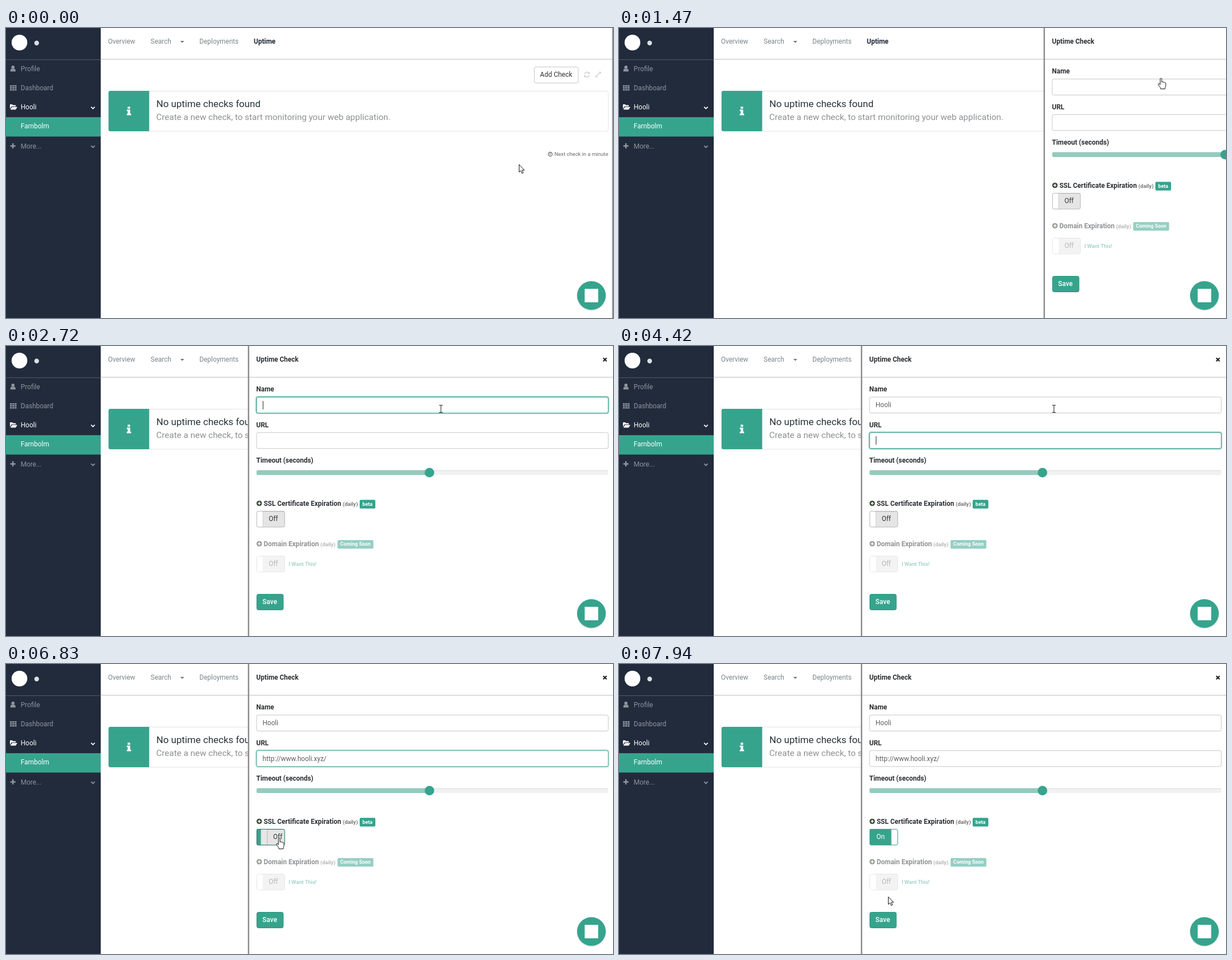
These frames come from a looping animation (1083 px wide and 517 px high, 8000 ms). An HTML page:

```html
<!DOCTYPE html>
<html lang="en">
<head>
<meta charset="utf-8">
<title>Uptime check</title>
<style>
html, body { margin: 0; width: 100%; height: 100%; overflow: hidden; background: #fff; }
svg { display: block; width: 1083px; height: 517px; }
text { font: 12px Roboto, Arial, sans-serif; fill: #333; white-space: pre; }
.b { font-weight: 700; fill: #2b2f33; }
.nav { fill: #7b868c; }
.side { fill: #8f959e; }
.w { fill: #fff; }
.m { text-anchor: middle; }
.s { font-size: 9.5px; }
.badge { font-size: 9px; font-weight: 700; fill: #fff; text-anchor: middle; }
.val { fill: #5a5d60; }
.teal { fill: #36a48d; }
.box { fill: #fff; stroke: #c6c6c6; }
.line { fill: none; stroke-width: 1.8; }
.focus rect { fill: none; stroke: #36a48d; }
.cur { fill: #fff; stroke: #111; stroke-linejoin: round; }
</style>
</head>
<body>
<svg viewBox="0 0 1083 517" xmlns="http://www.w3.org/2000/svg">
  <defs>
    <clipPath id="clipOn"><rect x="447" y="294" width="50.5" height="29" rx="3"/></clipPath>
    <g id="plusDot">
      <circle cx="451.8" cy="280.5" r="4.8"/>
      <path d="M449 280.5h5.6M451.8 277.7v5.6" stroke="#fff" stroke-width="1.6"/>
    </g>
  </defs>
  <rect width="1083" height="517" fill="#fff"/>

  <!-- main page -->
  <g>
    <rect x="169" y="55" width="914" height="1.3" fill="#c9cbcd"/>
    <text class="nav" x="182" y="28">Overview</text>
    <text class="nav" x="258" y="28">Search</text>
    <path d="M311 23h7l-3.5 3.6z" fill="#6d767c"/>
    <text class="nav" x="345" y="28">Deployments</text>
    <text class="b" x="442" y="28" style="fill:#1c2536">Uptime</text>

    <rect id="add" class="box" x="942.5" y="69.5" width="78.5" height="28.5" rx="2.5"/>
    <text class="m" x="981.6" y="87.3">Add Check</text>
    <g fill="none" stroke="#cfcfcf" stroke-width="1.5">
      <path d="M1032.2 82a4.4 4.4 0 0 1 7.6-2M1040.6 84a4.4 4.4 0 0 1-7.6 2"/>
      <path d="M1053.5 86l6-6" />
      <path d="M1041.5 77.8v4h-4zM1031.4 88.2v-4h4zM1061.5 78v4l-4-4zM1051.6 88v-4l4 4z" fill="#cfcfcf" stroke="none"/>
    </g>

    <rect x="183" y="112.5" width="891.5" height="71.5" rx="3" fill="#fff" stroke="#e4e4e4"/>
    <path class="teal" d="M186 112h69.5v72H186a3 3 0 0 1-3-3v-66a3 3 0 0 1 3-3z"/>
    <path class="w" d="M217 140.3h4.4v3.6H217zM215.5 145.6h6v7.2h1.7v2.6h-7.7v-2.6h1.7v-4.6h-1.7z"/>
    <text x="268.3" y="141" style="font-size:17.14px;fill:#263238">No uptime checks found</text>
    <text x="268" y="164.3" style="font-size:15.43px;fill:#8d9092">Create a new check, to start monitoring your web application.</text>

    <circle cx="971" cy="225" r="3.5" fill="none" stroke="#6a6a6a" stroke-width="1.3"/>
    <path d="M971.2 222.8v2.6h-1.8" fill="none" stroke="#6a6a6a"/>
    <text class="s" x="1074.5" y="228.3" text-anchor="end" style="fill:#6a6a6a">Next check in a minute</text>
  </g>

  <!-- sidebar -->
  <g>
    <rect width="169" height="517" fill="#222b3c"/>
    <rect y="56" width="169" height="1" fill="#515b69"/>
    <circle cx="24" cy="26" r="14" fill="#fff"/>
    <circle cx="54.7" cy="26.8" r="4.2" fill="#dcdfe2"/>
    <rect class="teal" y="159" width="169" height="34.5"/>
    <g fill="#8f959e">
      <circle cx="12.4" cy="70" r="2.9"/>
      <path d="M7.8 77.6v-2q0-2.6 2.4-3 2.2 1.6 4.4 0 2.4.4 2.4 3v2z"/>
      <path id="grid"/>
      <path d="M11 205.5h2.6v3.4H17v2.5h-3.4v3.4H11v-3.4H7.7v-2.5H11z"/>
    </g>
    <path class="w" d="M7 144.2v-7.2q0-1 1-1h3l1.2 1.4h4.3q1 0 1 1v1.4h-6.7q-1 0-1.6.8zM7.8 145.6l2.4-4q.5-.8 1.4-.8h8.6l-2.6 4.1q-.5.7-1.4.7z"/>
    <path class="line" stroke="#fff" d="M151.8 140.6l3.3 3.2 3.3-3.2"/>
    <path class="line" stroke="#8f959e" d="M151.8 209.8l3.3 3.2 3.3-3.2"/>
    <text class="side" x="26.3" y="76.8">Profile</text>
    <text class="side" x="26.3" y="111">Dashboard</text>
    <text class="w" x="26.3" y="145.3">Hooli</text>
    <text class="w" x="26.3" y="179.4">Farnbolm</text>
    <text class="side" x="26.3" y="214.5">More...</text>
  </g>

  <!-- sliding form -->
  <g id="panel">
    <rect x="431.5" width="3" height="517" fill="#8c8c8c"/>
    <rect x="434" width="660" height="517" fill="#fff"/>
    <rect x="434" y="55" width="660" height="1.3" fill="#c9cbcd"/>
    <text class="b" x="446.5" y="28">Uptime Check</text>
    <path d="M1065.6 21.2l6 6M1071.6 21.2l-6 6" stroke="#222" stroke-width="2.3"/>

    <text class="b" x="446.5" y="81">Name</text>
    <text class="b" x="446.5" y="144.5">URL</text>
    <text class="b" x="446.5" y="207.5">Timeout (seconds)</text>
    <rect class="box" x="447" y="91" width="627.5" height="28.5" rx="3"/>
    <rect class="box" x="447" y="154.3" width="627.5" height="28.5" rx="3"/>
    <g class="focus" id="focusName">
      <rect x="446.2" y="90.2" width="629" height="30" rx="3.5" stroke-width="2.6" opacity=".4"/>
      <rect x="447" y="91" width="627.5" height="28.5" rx="3"/>
    </g>
    <g class="focus" id="focusUrl">
      <rect x="446.2" y="153.5" width="629" height="30" rx="3.5" stroke-width="2.6" opacity=".4"/>
      <rect x="447" y="154.3" width="627.5" height="28.5" rx="3"/>
    </g>
    <text class="val" id="name" x="457.8" y="109.4"></text>
    <text class="val" id="url" x="457.8" y="172.6"></text>
    <path id="wave" fill="none" stroke="#e03a3a"/>
    <rect id="caret" width="1" height="15" fill="#222"/>

    <rect x="447" y="221.5" width="627.5" height="8.5" rx="2.5" fill="#f1f1f1"/>
    <rect x="447" y="221.5" width="627.5" height="1.2" rx=".6" fill="#e2e2e2"/>
    <rect x="447" y="221.5" width="309" height="8.5" rx="2.5" fill="#93cbbd"/>
    <circle class="teal" cx="755.5" cy="225.8" r="8.5"/>

    <use href="#plusDot" fill="#33482f"/>
    <text class="b" x="459.7" y="284.5">SSL Certificate Expiration</text>
    <text class="b s" x="600.8" y="284.5" style="fill:#777">(daily)</text>
    <rect class="teal" x="631" y="274.3" width="28" height="15.5" rx="2"/>
    <text class="badge" x="645" y="285">beta</text>

    <g clip-path="url(#clipOn)">
      <g id="slide">
        <rect class="teal" x="447" y="294" width="39.5" height="29"/>
        <text class="m w" x="466.7" y="312.3">On</text>
        <rect x="497" y="294" width="40" height="29" fill="#e5e5e5"/>
        <rect x="497" y="294" width="40" height="2" fill="#d2d2d2"/>
        <text class="m" x="516" y="312.3">Off</text>
        <rect id="knob" x="486" y="294" width="11.3" height="29" stroke-width=".8"/>
      </g>
    </g>
    <rect id="rim" x="447.5" y="294.5" width="49.7" height="28.3" rx="3" fill="none"/>

    <g opacity=".52">
      <use href="#plusDot" y="72" fill="#33482f"/>
      <text class="b" x="459.7" y="356.5">Domain Expiration</text>
      <text class="b s" x="560.8" y="356.5" style="fill:#777">(daily)</text>
      <rect class="teal" x="591.5" y="346" width="64" height="15.3" rx="2"/>
      <text class="badge" x="623.5" y="356.4">Coming Soon</text>
      <rect x="447.5" y="374.5" width="49.7" height="28.3" rx="3" fill="#e9e9e9" stroke="#d0d0d0"/>
      <rect x="448" y="375" width="10.3" height="27.3" rx="2" fill="#fff"/>
      <text class="m" x="477" y="392.3" style="fill:#777">Off</text>
      <text class="s teal" x="504.3" y="392" style="font-weight:500">I Want This!</text>
    </g>

    <rect class="teal" x="447.5" y="442.5" width="47.3" height="28" rx="3" stroke="#2f927d"/>
    <text class="m w" x="470.6" y="460" style="font-weight:500">Save</text>
  </g>

  <!-- chat button -->
  <circle cx="1044.5" cy="478" r="26.3" fill="#000" opacity=".09"/>
  <circle class="teal" cx="1044.5" cy="476.8" r="25.6"/>
  <rect x="1032.5" y="465" width="24" height="24" fill="#fff"/>

  <g id="cursor">
    <path class="cur" id="arrow" d="M.5.5V14L3.6 11.2 5.7 16 8 15 5.9 10.4H9.8Z"/>
    <path class="cur" id="hand" d="M-1.4 1.4Q0-.6 1.4 1.4V7.6Q2.8 5.8 4 7.8 5.4 6.4 6.4 8.4 8.3 7.6 8.5 10V13.6Q8.4 16 7.2 17.6V19.6H-.6V17.8Q-3.6 14.6-4.8 11.6-5 9.4-3.2 10L-1.4 12Z"/>
    <path id="beam" d="M-3-6.5h2.2l.8.7.8-.7H3M0-6V6M-3 6.5h2.2l.8-.7.8.7H3" fill="none" stroke="#111"/>
  </g>
</svg>
<script>
const LOOP = 8000;
const $ = id => document.getElementById(id);
const show = (id, on) => $(id).setAttribute("visibility", on ? "visible" : "hidden");
const put = (id, x, y) => $(id).setAttribute("transform", `translate(${x} ${y})`);
const within = (v, a, b) => v >= a && v < b;

// progress from 0 to 1 in n visible steps, the first at a and the last at b
function steps(t, a, b, n) {
  if (t < a) return 0;
  return Math.min(1, (Math.floor((t - a) / (b - a) * (n - 1) + 1e-6) + 1) / n);
}

// start, end, steps, evenly spaced way points
const moves = [
  [370, 1150, 11, [[915, 243], [927, 212], [950, 150], [964, 104], [967, 89]]],
  [1850, 2240, 6, [[967, 93], [880, 99], [800, 108], [776, 112]]],
  [5510, 6290, 11, [[776, 112], [738, 168], [640, 255], [557, 308.8], [513, 310], [501, 309.5]]],
  [6360, 6600, 4, [[501, 309.5], [487.5, 310]]],
  [7610, 7940, 5, [[487.5, 310], [484, 345], [480, 395], [480, 414.5]]]
];

function along(pts, p) {
  const u = p * (pts.length - 1), i = Math.min(pts.length - 2, Math.floor(u)), f = u - i;
  return [0, 1].map(k => pts[i][k] + (pts[i + 1][k] - pts[i][k]) * f);
}

function pointer(t) {
  const m = moves.filter(m => t >= m[0]).pop() || moves[0];
  return along(m[3], steps(t, m[0], m[1], m[2]));
}

const keys = [3330, 3650, 3800, 4040, 4120];
const address = "http://www.hooli.xyz/";

function setText(id, s) {
  const el = $(id);
  if (el.textContent !== s) el.textContent = s;
  return s ? el.getComputedTextLength() : 0;
}

function draw(t) {
  const [x, y] = pointer(t);
  const overToggle = t > 6300 && x < 498 && within(y, 294, 323);
  const overAdd = t < 1850 && y < 98;
  const overField = t >= 1850 && (within(y, 91, 120) || within(y, 154, 183));
  const hand = overToggle || overAdd;
  put("cursor", x, y);
  show("hand", hand);
  show("beam", overField);
  show("arrow", !hand && !overField);

  const add = $("add").style;
  add.fill = overAdd ? (t >= 1240 ? "#d9d9d9" : "#e8e8e8") : "#fff";
  add.stroke = overAdd ? "#adadad" : "#c6c6c6";

  put("panel", 650 * (1 - Math.pow(steps(t, 1240, 1540, 5) * 1.25 - .25 > 0
    ? steps(t, 1240, 1540, 5) * 1.25 - .25 : 0, 2.42)), 0);

  const nameOut = steps(t, 4270, 4420, 3);
  $("focusName").setAttribute("opacity", steps(t, 2410, 2720, 5) * (1 - nameOut));
  $("focusUrl").setAttribute("opacity", nameOut * (1 - steps(t, 6830, 7050, 4)));

  const nameW = setText("name", "Hooli".slice(0, keys.filter(k => t >= k).length));
  const urlW = setText("url", t >= 4730 ? address : "");
  show("wave", within(t, 4820, 6830));
  const inUrl = t >= 4270;
  put("caret", 458.2 + (inUrl ? urlW : nameW), inUrl ? 161 : 98);
  show("caret", within(t, 2570, 3100) || within(t, 3330, 5280) || within(t, 5810, 6340));

  const on = steps(t, 6830, 7150, 5);
  put("slide", -39 * (1 - on), 0);
  $("knob").style.fill = overToggle ? "#e6e6e6" : "#fff";
  $("knob").style.stroke = overToggle ? "#adadad" : "#c6c6c6";
  $("rim").style.stroke = on ? (overToggle ? "#21705f" : "#36a48d") : (overToggle ? "#999" : "#b9b9b9");
}

let dots = "", zig = "M490 175.5";
for (let r = 0; r < 3; r++)
  for (let c = 0; c < 3; c++) dots += `M${7 + c * 4.2} ${102 + r * 3.5}h3.4v2.5h-3.4z`;
for (let i = 1; i <= 40; i++) zig += `L${490 + i * 2} ${i % 2 ? 173.8 : 175.5}`;
$("grid").setAttribute("d", dots);
$("wave").setAttribute("d", zig);

function tick() {
  draw(performance.now() % LOOP);
  requestAnimationFrame(tick);
}
tick();
</script>
</body>
</html>
```
